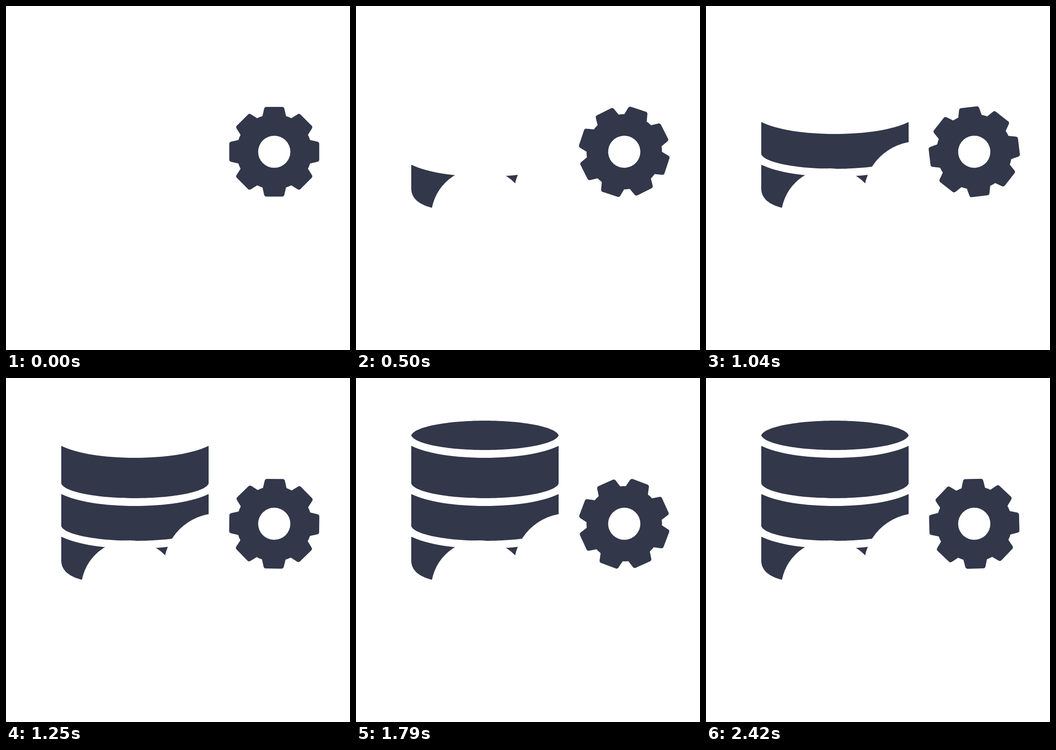
These frames come from a looping animation (747x750 px, 2.46 s). An HTML page with a canvas:

```html
<!DOCTYPE html>
<html lang="en">
<head>
<meta charset="utf-8">
<title>Database and gear</title>
<style>
  html, body { margin: 0; width: 100%; height: 100%; overflow: hidden; background: #fff; }
  canvas { display: block; }
</style>
</head>
<body>
<canvas width="747" height="750"></canvas>
<script>
const ctx = document.querySelector('canvas').getContext('2d');
const INK = '#32374a', PAPER = '#fff';
const FPS = 24, FRAMES = 59, LOOP = 2460;

// Rim curves of the cylinder, starting at height y on one side
const hollow = y => `M120 ${y}C155 ${y + 17} 215 ${y + 26} 280 ${y + 26}S405 ${y + 17} 440 ${y}`;
const bulge = y => `C434 ${y + 18} 364 ${y + 32} 280 ${y + 32}S126 ${y + 18} 120 ${y}Z`;

// Slices from bottom to top; each one appears ten steps after the last
const slices = [
  hollow(346) + 'V440H165C138 433 120 420 120 398Z',
  hollow(253) + 'V323' + bulge(323),
  hollow(148) + 'V230' + bulge(230),
  'M120 125C126 107 196 93 280 93S434 107 440 125' + bulge(125)
].map(d => new Path2D(d));

const tooth = new Path2D('M-26 -76L-22 -93.5Q-21 -97.7 -17 -97.7H17Q21 -97.7 22 -93.5L26 -76Z');

function disc(x, y, r, color) {
  ctx.fillStyle = color;
  ctx.beginPath();
  ctx.arc(x, y, r, 0, 2 * Math.PI);
  ctx.fill();
}

function drawGear(angle) {
  ctx.save();
  ctx.translate(582.5, 317.8);
  ctx.rotate(angle);
  disc(0, 0, 82, INK);
  for (let i = 0; i < 8; i++) {
    ctx.fill(tooth);
    ctx.rotate(Math.PI / 4);
  }
  disc(0, 0, 35, PAPER);
  ctx.restore();
}

function draw(now) {
  const step = Math.min(FRAMES - 1, Math.floor((now % LOOP + 4.9) * FPS / 1000));
  ctx.fillStyle = PAPER;
  ctx.fillRect(0, 0, 747, 750);
  ctx.fillStyle = INK;
  slices.slice(0, Math.floor(step / 10)).forEach(s => ctx.fill(s));
  // Cloud-shaped cut-out
  disc(269, 460, 106, PAPER);
  disc(460.5, 413, 118, PAPER);
  drawGear(step / FRAMES * Math.PI / 2);
  requestAnimationFrame(() => draw(performance.now() - start));
}

const start = performance.now();
draw(0);
</script>
</body>
</html>
```
